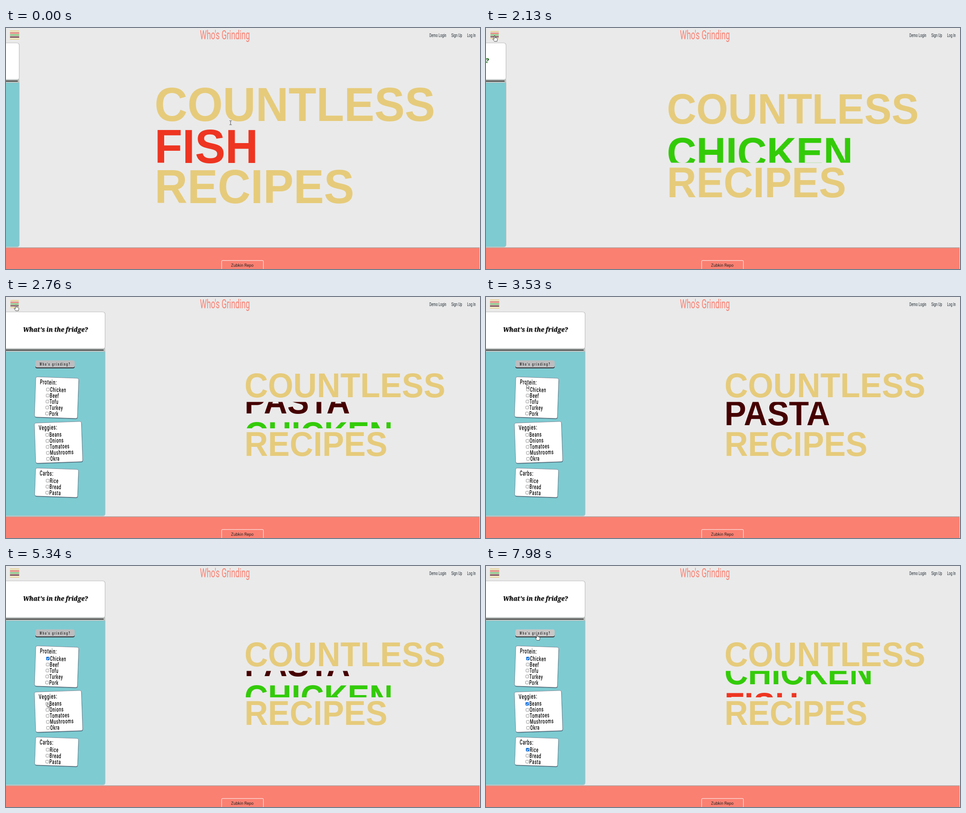
An HTML page for the animation above (8000 ms loop, 1049x534 px).

```html
<!DOCTYPE html>
<html lang="en">
<head>
<meta charset="utf-8">
<title>Recipe finder</title>
<style>
  html, body { margin: 0; width: 100%; height: 100%; overflow: hidden; background: #eaeaea; }
  svg { display: block; width: 100%; height: 100%; }
  .narrow { font-family: Roboto, sans-serif; }
  .big { font: bold 100.7px "Liberation Sans", Arial, sans-serif; }
  .fridge { font: italic 900 13.5px "Noto Serif", serif; text-anchor: middle; }
</style>
</head>
<body>
<svg id="stage" viewBox="0 0 1049 534"></svg>
<script>
const LOOP = 8000;
const CONDENSE = 0.6;   // one narrow look for all Roboto display text
const TALL = 1.05;      // taller capitals for the headline
const EM = 100.7;
const YELLOW = '#e6cb7b', RED = '#ee3521', GREEN = '#33cb08', BROWN = '#450000', SALMON = '#fa8072';

const stage = document.getElementById('stage');
const $ = id => document.getElementById(id);
const lerp = (a, b, p) => a + (b - a) * p;
const clamp = v => Math.min(1, Math.max(0, v));
const set = (id, name, value) => $(id).setAttribute(name, value);
const show = (id, on) => set(id, 'visibility', on ? 'visible' : 'hidden');

// CSS-style cubic-bezier easing
function bezier(x1, y1, x2, y2) {
  const at = (u, a, b) => 3 * u * (1 - u) * (1 - u) * a + 3 * u * u * (1 - u) * b + u * u * u;
  return x => {
    let lo = 0, hi = 1;
    for (let i = 0; i < 24; i++) {
      const mid = (lo + hi) / 2;
      if (at(mid, x1, x2) < x) lo = mid; else hi = mid;
    }
    return at(lo, y1, y2);
  };
}
const ease = bezier(.25, .1, .25, 1);
const easeIn = bezier(.42, 0, 1, 1);

// Smooth curve through [time, value] points; flat at the start and at turning points
function curve(points) {
  const slope = i => (points[i + 1][1] - points[i][1]) / (points[i + 1][0] - points[i][0]);
  const last = points.length - 1;
  const tangent = points.map((p, i) => {
    if (!i) return 0;
    if (i === last) return slope(i - 1);
    const a = slope(i - 1), b = slope(i);
    return a * b <= 0 ? 0 : 2 * a * b / (a + b);
  });
  return t => {
    if (t <= points[0][0]) return points[0][1];
    let i = 0;
    while (i < last - 1 && t > points[i + 1][0]) i++;
    const [t0, v0] = points[i], [t1, v1] = points[i + 1];
    const d = t1 - t0, u = clamp((t - t0) / d), w = 1 - u;
    return v0 * (1 + 2 * u) * w * w + tangent[i] * d * u * w * w +
           v1 * u * u * (3 - 2 * u) - tangent[i + 1] * d * u * u * w;
  };
}

// Ticker position in lines: -1 fish, 0 chicken, 1 pasta
const ticker = curve([
  [300, -1], [900, -.73], [1510, -.29], [2130, .15], [2760, .58], [3600, .95],
  [4370, .73], [5150, .465], [6320, .036], [6650, 0], [6800, 0], [7980, -.366]
]);

const path = [
  [320, 497, 210], [1100, 178, 56], [1510, 28, 18], [1900, 19, 17], [2130, 19, 17],
  [2760, 22, 18], [2850, 22, 18], [3600, 92, 200], [3800, 93, 205], [4430, 93, 205],
  [5240, 92, 300], [5380, 91, 304], [5600, 91, 304], [6060, 91, 364], [6320, 92, 399],
  [6450, 91, 405], [6900, 91, 405], [7700, 112, 178], [7980, 113, 152]
];
const cursorX = curve(path.map(p => [p[0], p[1]]));
const cursorY = curve(path.map(p => [p[0], p[2]]));

const narrow = (text, x, y, size, attrs = '') =>
  `<text class="narrow" transform="translate(${x} ${y}) scale(${CONDENSE} 1)" font-size="${size}" ${attrs}>${text}</text>`;
const big = (id, text, color) => `<text id="${id}" class="big" fill="${color}">${text}</text>`;
const rect = (x, y, w, h, r, attrs) => `<rect x="${x}" y="${y}" width="${w}" height="${h}" rx="${r}" ${attrs}/>`;

const label = 'letter-spacing="1.3" font-weight="500"';

function card(title, items, cx, cy, w, h, angle) {
  const left = -w / 2, top = -h / 2;
  const rows = items.map((item, i) => {
    const y = top + 27.2 + 13.3 * i, x = left + 27.5;
    return rect(x - 3.2, y - 3.2, 6.4, 6.4, 1.2, 'fill="#fff" stroke="#777" stroke-width=".8"') +
      `<g id="${item}" visibility="hidden" transform="translate(${x} ${y})">` +
      rect(-3.6, -3.6, 7.2, 7.2, 1.2, 'fill="#0b6fe0"') +
      '<path d="M-2.1 .1L-.6 1.7L2.2-1.7" fill="none" stroke="#fff" stroke-width="1.1"/></g>' +
      narrow(item, left + 32.3, y + 4.6, 14.2, label);
  }).join('');
  return `<g transform="translate(${cx} ${cy}) rotate(${angle})">` +
    rect(left + .5, top + 1.5, w, h, 4, 'fill="#234" opacity=".55"') +
    rect(left, top, w, h, 4, 'fill="#fff" stroke="#667" stroke-width=".7"') +
    narrow(title, left + 9.5, top + 16, 15, label) + rows + '</g>';
}

const bars = [YELLOW, '#d9492c', '#479a2c', BROWN, YELLOW].map((color, i) =>
  rect(-10.2, -9.9 + 4.4 * i, 20.4, 1.9, 0, `fill="${color}"`)).join('');

stage.innerHTML = `
<defs><clipPath id="slot"><rect id="slotBox" x="0" width="1049"/></clipPath></defs>
<rect width="1049" height="534" fill="#eaeaea"/>
${narrow("Who's Grinding", 484.5, 25.2, 28, `fill="${SALMON}" text-anchor="middle"`)}
<g fill="#1f2a33">
  ${narrow('Demo Login', 937, 20.3, 11.7)}
  ${narrow('Sign Up', 985.5, 20.3, 11.7)}
  ${narrow('Log In', 1020.5, 20.3, 11.7)}
</g>
${big('top', 'COUNTLESS', YELLOW)}
<g clip-path="url(#slot)">
  ${big('pasta', 'PASTA', BROWN)}${big('chicken', 'CHICKEN', GREEN)}${big('fish', 'FISH', RED)}
</g>
${big('bottom', 'RECIPES', YELLOW)}
<rect y="486" width="1048" height="48" fill="#b0aaa6"/>
<rect y="487.5" width="1048" height="47" fill="${SALMON}"/>
${rect(477.2, 515.2, 92.5, 30, 2, 'fill="none" stroke="#fff" stroke-width="1"')}
<text class="narrow" x="523" y="529" font-size="9" text-anchor="middle" fill="#222">Zubkin Repo</text>
<g id="panel">
  ${rect(-40, 33, 259.3, 82, 5, 'fill="#fff" stroke="#bdbdbd" stroke-width="1.2"')}
  <rect x="-40" y="113.5" width="259.5" height="8" fill="#b9bebc"/>
  <rect x="-40" y="116.8" width="256" height="1.6" fill="#111"/>
  <path d="M-40 121H219.3V480q0 5-5 5H-40Z" fill="#7ecbd2" stroke="#b5bcbc" stroke-width="1"/>
  <text class="fridge" x="110" y="78.3" fill="#aaa">What's in the fridge?</text>
  <text class="fridge" id="ask" x="109" y="77.3">What's in the fridge?</text>
  ${rect(65, 142, 87, 16, 4, 'fill="#1d1d22"')}
  <rect id="button" x="65" y="140.5" width="87" height="15.7" rx="4"/>
  ${narrow("Who's grinding?", 109, 151.6, 8.6, 'letter-spacing="3.6" font-weight="700" text-anchor="middle" fill="#222"')}
  ${card('Protein:', ['Chicken', 'Beef', 'Tofu', 'Turkey', 'Pork'], 112, 223, 95, 89, 2)}
  ${card('Veggies:', ['Beans', 'Onions', 'Tomatoes', 'Mushrooms', 'Okra'], 116.3, 322, 104, 89, -2)}
  ${card('Carbs:', ['Rice', 'Bread', 'Pasta'], 112, 411.5, 95, 62, 2)}
</g>
<g id="menu">${bars}</g>
<g id="cursor" fill="#fff" stroke="#222" stroke-width=".8" stroke-linejoin="round">
  <path id="beam" d="M-2.5-4.5H-.8L0-3.8L.8-4.5H2.5M0-3.8V3.8M-2.5 4.5H-.8L0 3.8L.8 4.5H2.5" fill="none"/>
  <path id="arrow" d="M0 0V9.4L2.2 7.4L3.7 10.8L5.2 10.1L3.7 6.9H6.7Z"/>
  <path id="hand" d="M-1 .8Q0-.6 1 .8V4.6L2.5 4.7L4.2 5.2L5.8 5.9Q6.6 6.3 6.4 7.8L5.4 12.6H-.4L-3.8 8.2Q-4.2 6.9-3 6.8L-1 8.2Z"/>
</g>`;

const ticks = { Chicken: 4000, Beans: 5420, Rice: 6780 };

function draw(t) {
  const slide = clamp((t - 1960) / 750);
  const shrink = ease(slide), open = easeIn(slide);

  // headline
  const k = lerp(1, .716, shrink), x = lerp(328.7, 527.7, shrink);
  const place = (id, y) => set(id, 'transform', `translate(${x} ${y}) scale(${k} ${k * TALL})`);
  const slotTop = lerp(221, 232.5, shrink), rest = slotTop + 78 * k, line = EM * k, s = ticker(t);
  place('top', lerp(206, 222, shrink));
  place('bottom', lerp(388, 352, shrink));
  place('pasta', rest + (s - 1) * line);
  place('chicken', rest + s * line);
  place('fish', rest + (s + 1) * line);
  set('slotBox', 'y', slotTop);
  set('slotBox', 'height', 81.7 * k);

  // side panel
  set('panel', 'transform', `translate(${lerp(-190, 0, open)} 0)`);
  set('ask', 'fill', `rgb(0,${Math.round(100 * (1 - open))},0)`);
  for (const name in ticks) show(name, t >= ticks[name]);

  // pointer and hover states
  const px = cursorX(t), py = cursorY(t);
  const onMenu = px < 30 && py < 27;
  const onButton = px > 65 && px < 152 && py > 140 && py < 158;
  const onText = t < 1500 && px > 329;
  set('cursor', 'transform', `translate(${px} ${py})`);
  show('beam', onText);
  show('hand', onMenu || onButton);
  show('arrow', !onText && !onMenu && !onButton);
  set('button', 'fill', onButton ? '#c9c7c7' : '#bdbdbf');
  const hover = ease(clamp((t - 1510) / 300)) - ease(clamp((t - 2900) / 300));
  set('menu', 'transform', `translate(19 15.7) scale(${1 - .1 * hover})`);
}

const start = performance.now();
function tick(now) {
  draw(Math.max(0, now - start) % LOOP);
  requestAnimationFrame(tick);
}
draw(0);
requestAnimationFrame(tick);
</script>
</body>
</html>
```
